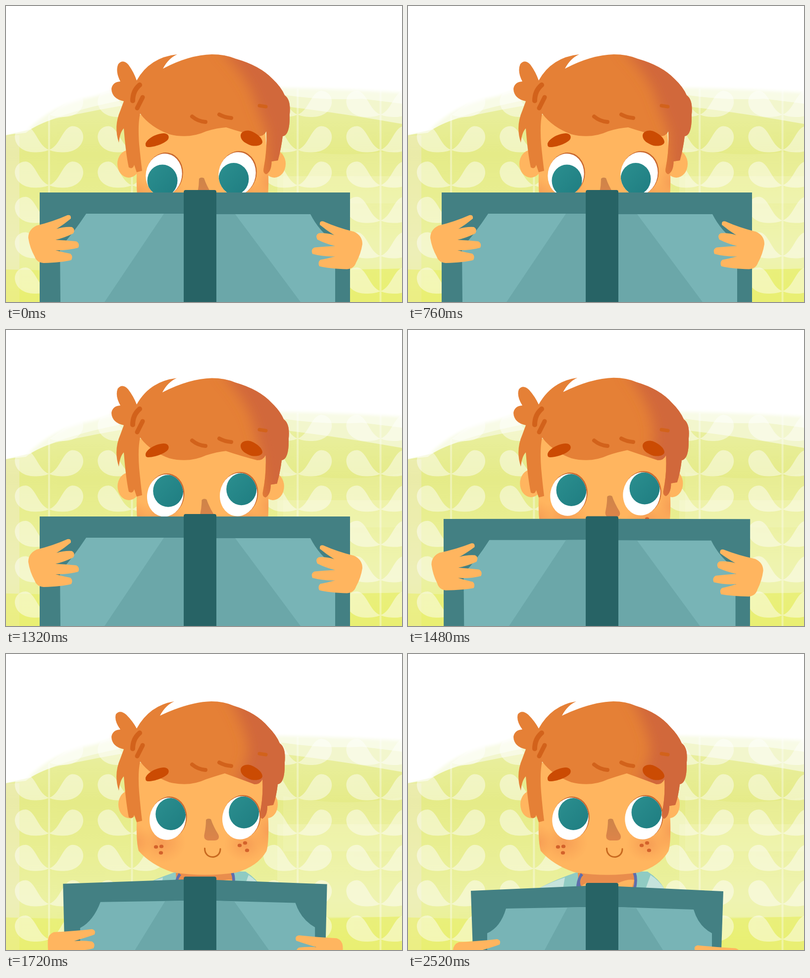
These frames come from a looping animation (800x600 px, 2.8 s). An HTML page:

```html
<!DOCTYPE html>
<html lang="en">
<head>
<meta charset="utf-8">
<title>Boy with a book</title>
<style>
html, body { margin: 0; width: 100%; height: 100%; overflow: hidden; background: #fff; }
svg { display: block; width: 100vw; height: 100vh; }
</style>
</head>
<body>
<svg viewBox="0 0 800 600" preserveAspectRatio="xMidYMid slice">
<defs>
  <linearGradient id="wall" gradientUnits="userSpaceOnUse" x1="0" y1="200" x2="0" y2="600">
    <stop offset="0" stop-color="#e9ef9f"/>
    <stop offset=".25" stop-color="#e5eb88"/>
    <stop offset=".45" stop-color="#e8ee90"/>
    <stop offset=".75" stop-color="#ebf1a2"/>
    <stop offset="1" stop-color="#eaf089"/>
  </linearGradient>
  <linearGradient id="iris" x1="0" y1="0" x2="1" y2="1">
    <stop offset="0" stop-color="#2b8f8f"/>
    <stop offset="1" stop-color="#1f7d81"/>
  </linearGradient>
  <linearGradient id="noseFill" x1="0" y1="0" x2="0" y2="1">
    <stop offset="0" stop-color="#cd8449"/>
    <stop offset="1" stop-color="#dd8449"/>
  </linearGradient>
  <radialGradient id="blush">
    <stop offset="0" stop-color="#f08c4e" stop-opacity=".6"/>
    <stop offset=".5" stop-color="#f4954f" stop-opacity=".35"/>
    <stop offset="1" stop-color="#f99c50" stop-opacity="0"/>
  </radialGradient>
  <filter id="soft" x="-40%" y="-30%" width="180%" height="160%"><feGaussianBlur stdDeviation="13"/></filter>
  <filter id="mist"><feGaussianBlur stdDeviation="3"/></filter>
  <clipPath id="wallClip"><path d="M0,262 L65,236 L130,192 L230,168 H800 V600 H0Z"/></clipPath>
  <clipPath id="hairClip"><path id="hairEdge"/></clipPath>
  <clipPath id="faceClip"><path id="faceEdge"/></clipPath>
  <clipPath id="eyeClip0"><ellipse id="hole0" rx="36.5" ry="43"/></clipPath>
  <clipPath id="eyeClip1"><ellipse id="hole1" rx="37.5" ry="44"/></clipPath>
  <g id="sprig">
    <path id="leaf" d="M0,0 C-23,-8 -27,-46 -47,-48 C-62,-48 -70,-36 -69,-24 C-67,-6 -50,5 -30,5 C-18,5 -8,4 0,0Z"/>
    <use href="#leaf" transform="scale(-1,1)"/>
  </g>
</defs>

<rect width="800" height="600" fill="#fff"/>
<path d="M40,256 Q90,200 180,183 L230,168 L560,166 Q680,168 800,176 V600 H0 V262Z" fill="#f8fbe6" filter="url(#mist)"/>
<path d="M50,250 Q110,216 230,192 L560,180 Q640,192 720,188 L800,198 V600 H0 V262Z" fill="#f2f6cd"/>
<path d="M0,262 L40,257 Q62,240 100,228 L185,211 L300,190 L560,203 Q670,216 800,239 V600 H0Z" fill="url(#wall)"/>
<g clip-path="url(#wallClip)">
  <path d="M560,288 Q680,312 800,290 V400 H560Z" fill="#fff" opacity=".1"/>
  <path d="M0,262 H27 V600 H0Z" fill="#f0ead0" opacity=".45"/>
  <path d="M548,345 H800 V533 H548Z" fill="#fff" opacity=".16"/>
  <path d="M0,534 Q400,545 800,532 V600 H0Z" fill="#e6ed55" opacity=".45"/>
  <g id="print" fill="#fff" opacity=".46"></g>
</g>

<path d="M264,475 Q300,456 345,441 H484 Q507,456 518,476Z" fill="#8fcbc3"/>
<path d="M264,475 Q290,462 317,453 L313,476Z M480,476 L490,448 Q508,460 518,476Z" fill="#c6e3dc"/>
<path d="M343,444 H460 L455,475 H345Z" fill="#e98d4d"/>
<path d="M346,474 Q356,466 360,464 H425 Q445,455 457,458 L452,476Z" fill="#ffb55f"/>
<path d="M349,444 Q340,458 340,474 H351 Q343,460 354,448Z M454,443 Q460,458 455,474 H461 Q465,455 460,442Z" fill="#5f6eac"/>

<ellipse id="earL" fill="#ffb55f"/>
<ellipse id="earR" fill="#ffb55f"/>
<path id="face" fill="#ffb55f"/>
<g clip-path="url(#faceClip)">
  <ellipse cx="316" cy="382" rx="48" ry="42" fill="url(#blush)"/>
  <ellipse cx="484" cy="386" rx="44" ry="36" fill="url(#blush)"/>
  <ellipse cx="532" cy="358" rx="34" ry="48" fill="url(#blush)"/>
  <ellipse cx="264" cy="382" rx="28" ry="38" fill="url(#blush)"/>
</g>
<g id="eyes"></g>
<path id="nose" d="M404,336 Q408,332 414,335 Q419,350 429,366 Q433,377 421,378 H408 Q398,377 401,364 Q404,350 404,336Z" fill="url(#noseFill)"/>
<path d="M401.500,394 C401,417 433,417 433,395" fill="none" stroke="#c8691f" stroke-width="3" stroke-linecap="round"/>
<g id="freckles" fill="#d3622b"></g>

<path id="hair" fill="#e58036"/>
<g clip-path="url(#hairClip)"><path id="shade" fill="#d1673a" filter="url(#soft)"/></g>
<g fill="none" stroke="#d2621b" stroke-linecap="round">
  <path d="M270,160 Q256,172 256,192" stroke-width="10"/>
  <path d="M276,185 L265,207" stroke-width="9"/>
  <path d="M376,224 Q388,234 403,235" stroke-width="8"/>
  <path d="M431,220 Q442,226 455,227" stroke-width="8"/>
  <path d="M512,202 L525,204" stroke-width="7"/>
</g>
<g id="brows" fill="#cb4b03">
  <path d="M282,253 C281,246 296,232 318,230 C328,230 331,237 327,243 C320,251 300,258 288,258 C284,258 282,257 282,253Z"/>
  <path d="M474,236 C473,226 486,222 496,226 C508,231 518,240 518,248 C517,254 508,257 496,255 C484,251 475,245 474,236Z"/>
</g>

<path id="cover" fill="#438083"/>
<path id="panels" fill="#78b4b6"/>
<path id="gloss" fill="#6ba7a9"/>
<rect id="spine" x="359" width="66" height="260" rx="4" fill="#276365"/>
<path id="handL" fill="#ffb55f"/>
<path id="handR" fill="#ffb55f"/>
</svg>

<script>
const LOOP = 2800, STEP = 40;
const $ = id => document.getElementById(id);
const set = (id, attrs) => { for (const k in attrs) $(id).setAttribute(k, attrs[k]); };
const clamp = v => Math.max(0, Math.min(1, v));

// Value at time t on a line through [time, value] keys
function key(t, keys) {
  if (t <= keys[0][0]) return keys[0][1];
  for (let i = 1; i < keys.length; i++) {
    const [a, u] = keys[i - 1], [b, v] = keys[i];
    if (t <= b) return u + (v - u) * (t - a) / (b - a);
  }
  return keys[keys.length - 1][1];
}

// Blend two paths of equal structure, x and y at their own rates
function mix([from, to], kx, ky = kx) {
  const ends = to.match(/-?[\d.]+/g);
  let i = 0;
  return from.replace(/-?[\d.]+/g, n => {
    const k = i % 2 ? ky : kx;
    return (+n + (ends[i++] - n) * k).toFixed(2);
  });
}

const mapPoints = (d, fn) =>
  d.replace(/(-?[\d.]+),(-?[\d.]+)/g, (_, x, y) => fn(+x, +y).map(v => v.toFixed(2)).join(','));

const HAIR = 'M228,277 Q217,244 231,212 L238,193 Q214,188 213,168 Q215,154 231,153 Q218,135 222,122 ' +
  'Q230,112 243,123 Q256,136 264,151 Q290,104 340,96 Q322,104 311,125 Q370,97 415,96 Q440,96 460,105 ' +
  'Q506,119 530,148 Q546,164 553,181 Q566,190 563,220 Q564,262 549,264 Q546,290 540,306 L528,308 ' +
  'Q528,328 518,334 Q511,332 513,322 Q520,290 518,254 Q514,264 502,264 Q470,252 442,242 ' +
  'Q425,247 404,254 Q370,270 330,260 Q292,246 271,218 Q266,240 269,280 Q272,315 275,338 L264,341 ' +
  'L259,326 Q256,336 248,331 Q242,300 238,248 Q230,256 228,277Z';
const FACE = 'M262,220 L264,340 Q263,380 268,399 Q292,427 335,442 Q400,453 465,443 Q508,431 526,400 ' +
  'Q531,386 530,340 L522,230Z';

const SHADE = [
  'M430,84 Q474,128 496,172 Q512,220 526,250 L532,350 L610,350 L610,84Z',
  'M444,80 Q470,120 484,164 Q500,210 466,252 L512,350 L610,350 L610,80Z'];
const COVER = [
  'M68,378 L359,378 L425,378 L695,378 L695,600 L68,600Z',
  'M127,480 L359,470 L425,471 L637,481 L633,600 L131,600Z'];
const PANELS = [
  'M162,421 L360,421 L360,600 L110,600 L109,490 Q135,462 162,421Z M425,422 L615,422 Q632,456 665,480 L665,600 L425,600Z',
  'M198,516 L360,513 L360,600 L160,600 L160,566 Q187,554 198,516Z M425,513 L577,518 Q587,552 614,566 L614,600 L425,600Z'];
const GLOSS = [
  'M319,421 L360,421 L360,600 L199,600Z M425,422 L463,422 L595,600 L425,600Z',
  'M322,514 L360,513 L360,600 L276,600Z M425,513 L461,515 L515,600 L425,600Z'];
const HAND = [
  'M62,445 Q95,437 124,424 Q132,422 131,431 Q118,442 102,452 Q118,447 133,448 Q141,452 136,461 ' +
  'Q118,470 100,474 Q122,475 142,477 Q150,481 146,490 Q124,496 100,495 Q118,500 130,502 ' +
  'Q136,507 132,515 Q112,520 76,521 Q62,520 58,508 Q48,490 45,470 Q45,453 62,445Z',
  'M75,494 Q115,492 152,488 Q161,490 157,499 Q140,505 116,512 Q135,511 152,513 Q160,518 155,527 ' +
  'Q135,532 112,532 Q135,536 153,541 Q161,547 156,556 Q135,558 110,552 Q125,562 137,566 ' +
  'Q141,571 136,578 Q105,574 78,572 Q68,568 66,550 Q62,530 63,510 Q64,498 75,494Z'];

const DROP = [[1360, 0], [1480, .05], [1520, .12], [1560, .23], [1600, .38], [1640, .56],
  [1680, .75], [1720, .86], [1760, .92], [1840, .97], [2000, 1]];
const NARROW = [[1360, 0], [1480, .066], [1600, .29], [1640, .46], [1680, .66], [1720, .8],
  [1760, .88], [1840, .96], [2000, 1]];
const TURN = [[1120, 0], [1240, .06], [1360, .27], [1480, .6], [1560, .9], [1640, 1]];
const NOSE = [[1120, 0], [1240, .15], [1360, .5], [1480, .88], [1640, 1]];
const BROW = [[880, 28], [1000, 22], [1080, 6.5], [1120, -3], [1200, 0]];
const EYE_X = [[880, 319], [1080, 320], [1240, 320.5], [1480, 324], [1600, 325.5], [1800, 327.5], [2000, 328]];
const EYE_Y = [[800, 342], [1080, 338], [1480, 334]];
const LOOK_X = [
  [[0, -3], [80, -2], [280, 6], [400, 7], [520, -3], [640, -3], [760, 2], [840, 4], [1000, 6]],
  [[0, -7], [80, -6], [280, 4], [400, 5], [520, -7], [760, -7], [840, -4], [1000, 6]]];
const LOOK_Y = [[800, 12], [880, 8], [1000, -8], [1080, -9], [1480, -9.5]];
const BLINK = [[2360, 0], [2400, .5], [2440, 1], [2480, .5], [2520, 0]];

function build() {
  let print = '';
  for (let i = 0; i < 5; i++) {
    const x = 87 + i * 167.4;
    print += `<rect x="${x - 2}" y="165" width="4" height="435" opacity=".75"/>`;
    for (let r = 0; r < 6; r++) print += `<use href="#sprig" x="${x}" y="${220 + r * 71.6}"/>`;
  }
  $('print').innerHTML = print;

  $('eyes').innerHTML = [0, 1].map(i => `
    <ellipse id="rim${i}" rx="${37 + i}" ry="${43.5 + i}" fill="#c9682f"/>
    <g clip-path="url(#eyeClip${i})">
      <ellipse id="white${i}" rx="${37 + i}" ry="${44 + i}" fill="#fff"/>
      <ellipse id="pupil${i}" rx="30.5" ry="32.5" fill="url(#iris)"/>
      <path id="lid${i}" fill="#ffb55f" stroke="#c9682f" stroke-width="3"/>
    </g>`).join('');

  $('freckles').innerHTML = [[303, 391], [314, 390], [313, 403], [472, 388], [483, 383], [487, 398]]
    .map(([x, y]) => `<ellipse cx="${x}" cy="${y}" rx="4.200" ry="3.600"/>`).join('');
  set('face', { d: FACE });
  set('faceEdge', { d: FACE });
}

function drawHead(t) {
  const turn = key(t, TURN), u = 1 - turn;
  const hair = mapPoints(HAIR, (x, y) => {
    let dx = 10 * clamp((x - 400) / 150), dy = 0;
    if (x < 270 && y < 150) { dx += (150 - y) / 6; dy -= (150 - y) / 7; }
    if (x > 300 && x < 345 && y < 130) dx += 6;
    if (x > 300 && y < 130) dy += 2;
    if (x > 430 && x < 480 && y > 230) dy += 4;
    if (y > 300) dy += x > 500 ? 7 : -4;
    return [x + dx * u, y + dy * u];
  });
  set('hair', { d: hair });
  set('hairEdge', { d: hair });
  set('shade', { d: mix(SHADE, turn) });
  set('earL', { cx: 249 - u, cy: 305 + 15 * u, rx: 22 + u, ry: 28 });
  set('earR', { cx: 528 + 14 * u, cy: 305 + 15 * u, rx: 21 + 2 * u, ry: 28 });
  const n = 1 - key(t, NOSE);
  set('nose', { transform: `translate(${-14 * n},${14 * n})` });
  set('brows', { transform: `translate(0,${key(t, BROW)})` });
}

function drawEyes(t) {
  const blink = key(t, BLINK);
  for (const i of [0, 1]) {
    const cx = key(t, EYE_X) + 148 * i, cy = key(t, EYE_Y) - 2 * i;
    const transform = `rotate(10 ${cx} ${cy})`;
    set('rim' + i, { cx: cx + 1.2, cy: cy - 1.8, transform });
    for (const part of ['white', 'hole']) set(part + i, { cx, cy, transform });
    set('pupil' + i, { cx: cx + key(t, LOOK_X[i]), cy: cy + key(t, LOOK_Y) - 1.5 * i });
    const y = blink ? cy - 43 + 66 * blink : cy - 90;
    set('lid' + i, { d: `M${cx - 60},${cy - 120} H${cx + 60} V${y} Q${cx},${y + 30 * blink} ${cx - 60},${y}Z` });
  }
}

function drawBook(t) {
  const drop = key(t, DROP), narrow = key(t, NARROW);
  set('cover', { d: mix(COVER, narrow, drop) });
  set('panels', { d: mix(PANELS, narrow, drop) });
  set('gloss', { d: mix(GLOSS, narrow, drop) });
  set('spine', { y: 373 + 91 * drop });
  const slide = clamp((drop - .38) / .62);
  const hand = mapPoints(mix(HAND, clamp(drop / .38)), (x, y) => [x + 28 * slide, y + 90 * slide]);
  set('handL', { d: hand });
  set('handR', { d: mapPoints(hand, (x, y) => [765 - x, y + 12.5]) });
}

function draw(ms) {
  const t = Math.floor(ms % LOOP / STEP) * STEP;
  drawHead(t);
  drawEyes(t);
  drawBook(t);
}

build();
const start = performance.now();
draw(0);
requestAnimationFrame(function tick(now) {
  draw(Math.max(0, now - start));
  requestAnimationFrame(tick);
});
</script>
</body>
</html>
```
